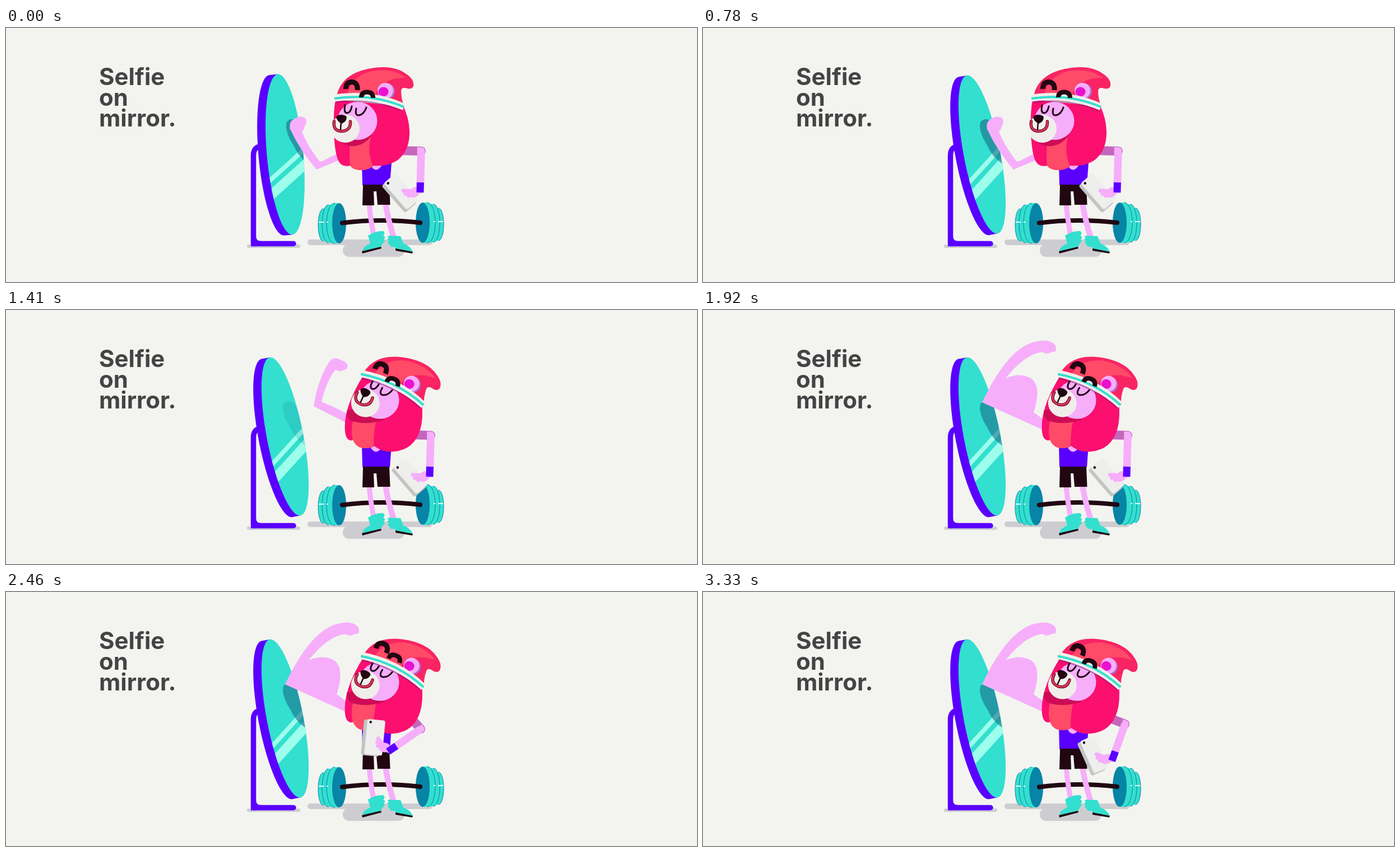
These frames come from a looping animation (1233x454 px, 3.6 s). An HTML page with a canvas:

```html
<!DOCTYPE html>
<html lang="en">
<head>
<meta charset="utf-8">
<title>Selfie on mirror</title>
<style>
html, body { margin: 0; width: 100%; height: 100%; overflow: hidden; background: #f3f4ef; }
canvas { display: block; width: 1233px; height: 454px; }
</style>
</head>
<body>
<canvas id="stage" width="1233" height="454"></canvas>
<script>
const ctx = document.getElementById('stage').getContext('2d');
const LOOP = 3600, RAD = Math.PI / 180;
const C = {
  bg: '#f3f4ef', text: '#444446', shade: '#cdcdd1', blue: '#5a00ff', teal: '#33dfcf',
  shine: '#9dfeec', deep: '#0784a6', ink: '#210712', skin: '#f6aefb', skinDark: '#c566bd',
  hot: '#fb0f6f', coral: '#ff4a68', wine: '#cd0c55', cream: '#f0eeea', magenta: '#ea12cf'
};

// Limb and mane outlines in each pose share one command order, so they can be blended.
const ARM = {
  lean: 'M602 233 L554 253 Q522 215 507 180 L526 180 Q538 212 560 239 Q566 238 572 234 Q580 230 586 227 L598 221Z',
  flex: 'M610 203 L549 172 Q556 125 577 92 L590 104 Q572 125 563 164 Q568 166 574 169 Q582 172 590 176 L610 186Z',
  bulge: 'M606 214 L498 165 Q550 55 606 55 L606 75 Q575 78 540 122 Q568 110 588 124 Q604 140 590 183 L608 196Z'
};
const FIST = {
  lean: 'M507 182 Q504 167 515 162 Q523 156 533 160 Q539 167 533 175 Q533 185 522 186Z',
  flex: 'M577 93 Q582 84 592 87 Q604 91 609 97 Q611 106 603 107 Q597 112 586 106Z',
  bulge: 'M600 55 Q616 53 626 60 Q632 66 629 74 Q623 75 620 76 Q612 81 602 72Z'
};
const MANE = [
  'M588 128 Q584 150 585 175 Q585 215 592 235 Q598 250 614 246 Q620 254 634 254 Q648 254 656 246 Q682 248 699 236 Q721 218 720 184 Q719 160 709 140Z',
  'M637 118 Q608 165 605 200 Q603 228 612 232 Q617 235 620 231 Q626 246 640 247 Q652 247 657 243 Q672 255 692 253 Q728 250 739 214 Q745 195 742 165Z'
];
const BEARD = [
  'M614 202 Q612 228 614 246 Q620 254 634 254 Q648 254 655 246 Q644 224 651 195Z',
  'M621 190 Q614 215 619 232 Q625 247 640 247 Q653 247 656 242 Q656 215 661 196Z'
];
const CHIN = [
  'M586 186 Q594 213 622 211 Q642 208 652 192 L620 180Z',
  'M608 180 Q607 193 616 198 Q642 207 676 196 L640 172Z'
];
// shoulder x y, elbow x y, wrist x y, phone angle, phone width
const HOLD = {
  start: [700, 219, 741, 220, 739, 290, -41, 28],
  rest: [720, 223, 758, 224, 756, 294, -41, 28],
  selfie: [720, 222, 740, 245, 685, 283, 5.5, 32],
  end: [722, 224, 753, 236, 731, 298, -24, 28]
};

const clamp = u => Math.max(0, Math.min(1, u));
const ease = u => u * u * (3 - 2 * u);
const lerp = (a, b, u) => a + (b - a) * u;
const span = (t, a, b) => ease(clamp((t - a) / (b - a)));
const bump = (t, a, b) => Math.sin(Math.PI * clamp((t - a) / (b - a)));
const mixList = (a, b, u) => a.map((v, i) => lerp(v, b[i], u));

function mixPath(a, b, u) {
  const goal = b.match(/[\d.]+/g);
  let i = 0;
  return a.replace(/[\d.]+/g, n => lerp(+n, +goal[i++], u).toFixed(2));
}

function track(t, ...keys) {
  for (let i = 1; i < keys.length; i++) {
    const [t0, v0] = keys[i - 1], [t1, v1] = keys[i];
    if (t < t1) return lerp(v0, v1, span(t, t0, t1));
  }
  return keys[keys.length - 1][1];
}

function fill(d, color) {
  ctx.fillStyle = color;
  ctx.fill(new Path2D(d));
}

function line(d, color, width, cap = 'round') {
  ctx.strokeStyle = color;
  ctx.lineWidth = width;
  ctx.lineCap = cap;
  ctx.lineJoin = 'round';
  ctx.stroke(new Path2D(d));
}

function oval(x, y, rx, ry, color, edge) {
  ctx.beginPath();
  ctx.ellipse(x, y, rx, ry, 0, 0, 7);
  ctx.fillStyle = color;
  ctx.fill();
  if (edge) {
    ctx.strokeStyle = edge;
    ctx.lineWidth = 1;
    ctx.stroke();
  }
}

function pill(x, y, w, h, r, color) {
  ctx.beginPath();
  ctx.roundRect(x, y, w, h, r);
  ctx.fillStyle = color;
  ctx.fill();
}

function group(draw) {
  ctx.save();
  draw();
  ctx.restore();
}

function title() {
  ctx.fillStyle = C.text;
  ctx.font = '700 42px Inter, Roboto, sans-serif';
  ['Selfie', 'on', 'mirror.'].forEach((s, i) => ctx.fillText(s, 166, 102 + 37 * i));
}

function mirror(t, shadow) {
  const tilt = track(t, [90, -5.2], [270, -25], [450, -6], [600, -13], [780, -11]);
  pill(430, 387, 95, 6, 3, C.shade);
  line('M458 211 Q441.5 211 441.5 228 V385.5 H513', C.blue, 9.5);
  fill('M437 380 V390.3 H446 V381 H456 Q446 381 446 372Z', C.blue);
  group(() => {
    ctx.translate(498 + Math.max(0, -11 - tilt) * .2, 226);
    ctx.rotate(tilt * RAD);
    oval(-15, 0, 32.5, 144, C.blue);
    ctx.fillRect(-15, -144, 15, 288);
    oval(0, 0, 32.5, 144, C.teal);
    ctx.clip();
    fill('M-40 45.5 L40 -14.5 V-4.5 L-40 55.5Z', C.shine);
    fill('M-40 66 L40 6 V27 L-40 87Z', C.shine);
    ctx.rotate(-tilt * RAD);
    ctx.translate(-498 + tilt + 11, -226);
    ctx.globalAlpha = shadow;
    fill('M495 168 Q502 160 512 165 L524 180 L540 246 Q518 234 508 211 Q494 190 494 174Z', '#1a6e8c');
  });
}

function slab(x, y, rx, ry) {
  oval(x, y, rx, ry, C.teal, C.deep);
  ctx.fillRect(x, y - ry, 10, 2 * ry);
}

function weights() {
  slab(566, 352, 9, 29);
  slab(575, 350, 11, 34);
  slab(586, 349, 14, 36);
  oval(594.5, 349, 12.5, 36, C.deep);
  line('M558 347 H567 M572 347 H575', '#e8fffb', 2, 'butt');
}

function barbell() {
  pill(538, 378, 223, 10, 5, C.shade);
  pill(601, 386, 110, 23, 11, C.shade);
  weights();
  group(() => {
    ctx.translate(1338, -1);
    ctx.scale(-1, 1);
    weights();
  });
  line('M600 348.5 Q669 340 739 348', C.ink, 8);
}

function body() {
  line('M648 312 Q650 340 656 370', C.skin, 9, 'butt');
  line('M677 312 Q681 340 692 375', C.skin, 10, 'butt');
  fill('M646 371 Q660 362 673 363 Q678 367 673 371 Q679 374 674 378 Q678 382 673 384 L669 391 L636 399 Q636 391 650 385Z', C.teal);
  fill('M635 399 L669 391 L670 394 L636 403Z', C.ink);
  fill('M684 371 Q694 372 704 372 L709 385 Q722 390 726 400 L695 395 L694 391 Q683 392 685 387 Q679 385 683 381 Q678 377 683 376 Q679 372 684 371Z', C.teal);
  fill('M695 394 L726 400 L725 403 L695 398Z', C.ink);
  fill('M635 240 H688 L685 281 H636Z', C.blue);
  fill('M649 243 Q660 264 672 243Z', C.skin);
  fill('M637 280 H684 L685.5 316 H663 L661 292 H656 L657 317 H636Z', C.ink);
}

function head(u, brows) {
  fill(mixPath(...MANE, u), C.hot);
  fill(mixPath(...BEARD, u), C.coral);
  fill(mixPath(...CHIN, u), C.wine);
  group(() => {
    ctx.translate(lerp(598, 640.5, u), lerp(161, 146, u));
    ctx.rotate(19.5 * u * RAD);
    ctx.translate(-598, -161);
    face();
  });
  group(() => {
    ctx.translate(lerp(648, 691, u), lerp(128, 137, u));
    ctx.rotate(19.5 * u * RAD);
    ctx.translate(-648, -128);
    hair(brows);
  });
}

function face() {
  const smile = 'M585.5 167 Q583 184.5 600 184.5 Q615.5 183 614.5 167';
  oval(627, 166, 35.5, 34, C.skin);
  oval(605.5, 180, 25.5, 25, C.cream);
  line(smile, '#861233', 5.5);
  line(smile, '#dc3a5a', 2.5);
  line('M598 167 L597 181', C.ink, 2.5);
  fill('M589 160 Q591 155 599 155 Q608 156 608 160 Q607 168 599 171 Q592 168 589 160Z', C.ink);
  line('M605 138 Q602 152 609 152 Q615 151 617 140', C.ink, 3);
  line('M625 144 Q622 157 630 156 Q639 154 643 142', C.ink, 3);
}

function hair([left, right]) {
  fill('M590 121 Q598 83 646 73 Q690 64 714 82 Q729 92 727 104 Q724 110 716 108 Q706 105 705 112 Q705 128 711 141 Q650 119 590 121Z', '#f92463');
  fill('M608 121 Q616 86 652 77 Q690 71 714 89 Q668 88 657 124 Q636 118 608 121Z', C.coral);
  oval(680, 113, 14, 14, '#b168cf');
  oval(677, 112, 14, 14, C.skin);
  oval(673.5, 114, 9, 8.5, C.magenta);
  line('M590 132 Q650 124 707 147', 'rgba(130,20,115,.5)', 4, 'butt');
  fill('M586 118.5 Q655 109 711 135 L708 147 Q650 123 586 131.5Z', C.cream);
  line('M586 126 Q652 116 710 141', C.teal, 4, 'butt');
  line(`M606.5 ${109 - left} Q606 ${96.5 - left} 617 ${96.5 - left} Q628 ${97 - left} 627 ${111 - left}`, C.ink, 9, 'butt');
  line(`M634 ${124 - right} Q634 ${114.5 - right} 645 ${114.5 - right} Q655 ${115 - right} 655 ${125 - right}`, C.ink, 8, 'butt');
}

function upperArm([sx, sy, ex, ey]) {
  line(`M${sx} ${sy} L${ex} ${ey}`, C.skinDark, 16);
}

function phoneArm([sx, sy, ex, ey, wx, wy, angle, width]) {
  const len = Math.hypot(wx - ex, wy - ey), dx = (wx - ex) / len, dy = (wy - ey) / len;
  group(() => {
    ctx.translate(wx, wy);
    ctx.rotate(angle * RAD);
    pill(-19 - width, -51, width, 64, 4, '#c4c4c4');
    pill(-13 - width, -52, width, 63, 4, '#eeeeed');
    oval(-7 - width, -47, 2.3, 2.3, C.ink);
    oval(-10, -4, 11, 8.5, C.skin);
    line('M-12 -8 L-23 -19 M-13 -6 L-24 -12.5 M-13 -3 L-22 -6', C.skin, 7);
    line('M-8 -3 L0 0', C.skin, 11);
  });
  line(`M${lerp(ex, sx, .18)} ${lerp(ey, sy, .18)} L${ex} ${ey} L${wx - dx * 8} ${wy - dy * 8}`, C.skin, 13.5, 'butt');
  line(`M${wx - dx * 14} ${wy - dy * 14} L${wx + dx * 4} ${wy + dy * 4}`, C.blue, 13, 'butt');
}

// The light sits behind the phone.
function flash(t) {
  const glow = span(t, 2180, 2230) * (1 - span(t, 2280, 2400));
  if (!glow) return;
  const g = ctx.createRadialGradient(637, 245, 20, 637, 245, 52);
  g.addColorStop(0, `rgba(255,255,255,${glow})`);
  g.addColorStop(1, 'rgba(255,255,255,0)');
  ctx.fillStyle = g;
  ctx.fillRect(580, 190, 115, 112);
}

function draw(t) {
  const turn = span(t, 810, 1140);
  const lift = span(t, 810, 1200);
  const pump = track(t, [1410, 0], [1620, 1.07], [1770, .98], [1920, 1]);
  const pose = set => pump > 0 ? mixPath(set.flex, set.bulge, pump) : mixPath(set.lean, set.flex, lift);
  let hold = mixList(HOLD.start, HOLD.rest, turn);
  hold = mixList(hold, HOLD.selfie, span(t, 2040, 2200));
  hold = mixList(hold, HOLD.end, span(t, 3130, 3330));
  const brows = [
    12 * bump(t, 2150, 2510) + 13 * bump(t, 2510, 2730),
    12 * bump(t, 2220, 2580) + 11 * bump(t, 2580, 2800)
  ];

  ctx.fillStyle = C.bg;
  ctx.fillRect(0, 0, 1233, 454);
  title();
  mirror(t, lerp(lerp(.62, .17, lift), .6, clamp(pump)));
  barbell();
  upperArm(hold);
  body();
  fill(pose(ARM), C.skin);
  fill(pose(FIST), C.skin);
  head(turn, brows);
  flash(t);
  phoneArm(hold);

  const white = span(t, 2190, 2262) * (1 - span(t, 2280, 2430));
  ctx.fillStyle = `rgba(255,255,255,${white})`;
  ctx.fillRect(0, 0, 1233, 454);
}

const begin = performance.now();
function tick(now) {
  draw(Math.max(0, now - begin) % LOOP);
  requestAnimationFrame(tick);
}
draw(0);
requestAnimationFrame(tick);
</script>
</body>
</html>
```
